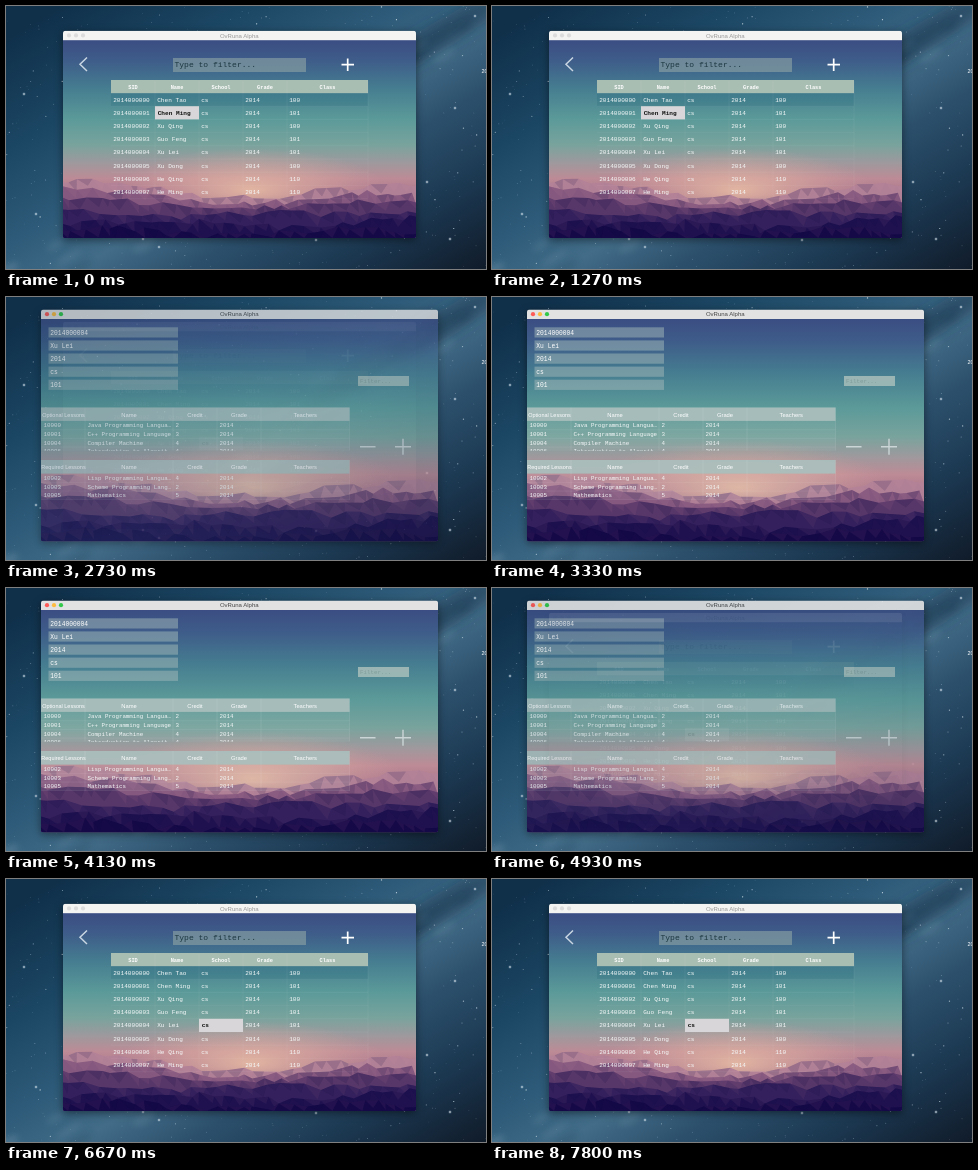
An HTML page for the animation above (7.87 s loop, 480 by 263 pixels).

```html
<!DOCTYPE html>
<html lang="en">
<head>
<meta charset="utf-8">
<title>Student records</title>
<style>
html, body { margin: 0; width: 100%; height: 100%; overflow: hidden; background: #1c3b56; }
svg { position: absolute; inset: 0; width: 100%; height: 100%; }
text { white-space: pre; }
.mono { font-family: "Liberation Mono", monospace; }
.sans { font-family: "Liberation Sans", sans-serif; }
.frame { filter: drop-shadow(0 2px 4px #0007); }
</style>
</head>
<body>
<svg id="desk" viewBox="0 0 480 263"></svg>
<svg id="list" viewBox="0 0 480 263"></svg>
<svg id="detail" viewBox="0 0 480 263"></svg>
<script>
const LOOP = 7870;
const TITLE = 'OvRuna Alpha';
const $ = id => document.getElementById(id);

function seeded(s) {
  return () => (s = (s * 16807) % 2147483647) / 2147483647;
}

const rect = (x, y, w, h, fill, extra = '') =>
  `<rect x="${x}" y="${y}" width="${w}" height="${h}" fill="${fill}" ${extra}/>`;
const dot = (x, y, r, fill, o = 1) =>
  `<circle cx="${x}" cy="${y}" r="${r}" fill="${fill}" opacity="${o}"/>`;
const line = (d, color, w) =>
  `<path d="${d}" fill="none" stroke="${color}" stroke-width="${w}"/>`;
const poly = (pts, fill) => `<polygon points="${pts.join(' ')}" fill="${fill}"/>`;
const label = (x, y, s, size, fill, cls = 'mono', extra = '') =>
  `<text x="${x}" y="${y}" font-size="${size}" fill="${fill}" class="${cls}" ${extra}>${s}</text>`;
const centered = (x, y, s, size, fill, cls, extra = '') =>
  label(x, y, s, size, fill, cls, 'text-anchor="middle" ' + extra);

function gradient(id, stops, where = 'x2="0" y2="1"', kind = 'linear') {
  return `<${kind}Gradient id="${id}" ${where}>` + stops.map(([at, c, o = 1]) =>
    `<stop offset="${at}" stop-color="${c}" stop-opacity="${o}"/>`).join('') + `</${kind}Gradient>`;
}

function desktop() {
  const rnd = seeded(77);
  const blur = (id, d) =>
    `<filter id="${id}" x="-50%" y="-150%" width="200%" height="400%"><feGaussianBlur stdDeviation="${d}"/></filter>`;
  const cloud = (x, y, rx, ry, fill, o, soft = 'soft') =>
    `<ellipse rx="${rx}" ry="${ry}" fill="${fill}" opacity="${o}" filter="url(#${soft})"
      transform="translate(${x} ${y}) rotate(-31)"/>`;
  // The galaxy band runs from the lower left to the upper right.
  let s = '<defs>' + blur('soft', 9) + blur('wisp', 3) + gradient('night',
    [[0, '#10304a'], [.2, '#1b4663'], [.38, '#2e5b79'], [.5, '#426c88'], [.62, '#2c506c'], [.78, '#1b3750'], [.95, '#101b29']],
    'gradientUnits="userSpaceOnUse" x1="90" y1="-20" x2="330" y2="380"') + '</defs>';
  s += rect(0, 0, 480, 263, 'url(#night)');
  s += cloud(400, 50, 120, 9, '#122a40', .75);
  for (let i = 0; i < 40; i++) {
    const x = 480 * rnd();
    s += cloud(x, 290 - .6 * x + 70 * (rnd() - .5), 8 + 18 * rnd(), 2 + 4 * rnd(), rnd() < .5 ? '#7396ab' : '#183750', .22, 'wisp');
  }
  for (let i = 0; i < 420; i++)
    s += dot(480 * rnd(), 263 * rnd(), .25 + .45 * rnd() ** 3, '#d8e8f2', .3 + .6 * rnd());
  for (const [x, y] of [[153, 241], [310, 234], [444, 233], [449, 102], [421, 176], [18, 88], [137, 233], [469, 10], [30, 208]])
    s += dot(x, y, 1.7, '#a8cde8', .25) + dot(x, y, .8, '#fff', .9);
  return s + label(475.5, 66.5, '20', 5.5, '#fff', 'sans');
}

// Low-poly dusk landscape, drawn in a 353 x 198 box.
function landscape(id) {
  const rnd = seeded(421);
  let s = '<defs>' + gradient(id + 'Sky', [[0, '#3b4d83'], [.1, '#3e5c89'], [.24, '#457c90'], [.4, '#5b9a99'],
    [.53, '#79a39d'], [.62, '#9e999d'], [.7, '#bd8b96'], [.78, '#a8758c'], [1, '#140848']]) +
    gradient(id + 'Glow', [[0, '#eabfa5', .85], [.5, '#e3b3a2', .45], [1, '#dca6a0', 0]], '', 'radial') + '</defs>';
  s += rect(0, 0, 353, 198, `url(#${id}Sky)`);
  s += `<ellipse cx="188" cy="150" rx="135" ry="42" fill="url(#${id}Glow)"/>`;
  const layers = [[154, '#b08096'], [160, '#85587f'], [167, '#573769'], [175, '#33205c'], [184, '#1f1150'], [192, '#150948']];
  layers.forEach(([base, color], depth) => {
    const ridge = [];
    for (let x = -12; x < 365; x += 6 + 12 * rnd()) {
      const valley = (12 - 2 * depth) * ((x - 190) / 176) ** 2;
      ridge.push([x, base - valley + 3 * Math.sin(x / 37 + base) - 7 * rnd() + 4]);
    }
    s += poly([[-12, 198], ...ridge, [365, 198]], color);
    for (let i = 1; i < ridge.length; i++) {
      const [a, b] = [ridge[i - 1], ridge[i]];
      const foot = [(a[0] + b[0]) / 2 + 6 * rnd(), Math.min(198, Math.max(a[1], b[1]) + 6 + 5 * rnd())];
      s += poly([a, b, foot], rnd() < .5 ? 'rgba(20,8,65,.14)' : 'rgba(225,150,175,.06)');
    }
  });
  return s;
}

function windowFrame(id, x, y, w, h, bar, lights, ink) {
  const k = w / 353;
  return `<clipPath id="${id}Clip">${rect(x, y, w, h, '#000', 'rx="2.5"')}</clipPath>` +
    `<g class="frame"><g clip-path="url(#${id}Clip)">` +
    `<g transform="translate(${x} ${y + h - 198 * k}) scale(${k})">${landscape(id)}</g>` +
    rect(x, y, w, 9.5, bar) + '</g></g>' +
    lights.map((c, i) => dot(x + 6 + 7 * i, y + 4.7, 2.1, c)).join('') +
    centered(233.3, y + 6.9, TITLE, 6, ink, 'sans');
}

const people = ['Chen Tao', 'Chen Ming', 'Xu Qing', 'Guo Feng', 'Xu Lei', 'Xu Dong', 'He Qing', 'He Ming'];
const classes = [100, 101, 100, 101, 101, 100, 110, 110];
const listCols = [105, 149, 193, 237, 281, 362];

function listWindow() {
  const rowY = i => 87 + 13.2 * i;
  const selected = (id, col, row, s) => `<g id="${id}">` +
    rect(listCols[col], rowY(row), 44, 13.2, '#d8d6d8') +
    label(listCols[col] + 2.7, rowY(row) + 8.6, s, 6.1, '#111', 'mono', 'font-weight="bold"') + '</g>';
  let s = windowFrame('listWin', 57, 24.7, 353, 207.3, '#f4f4f3', ['#dcdcdc', '#dcdcdc', '#dcdcdc'], '#999');
  s += line('M81 51.5 74 58.3 81 65', '#c9d6e2', 1.5);
  s += rect(167, 52, 133, 14, '#8fa5a6', 'opacity=".6"');
  s += label(168.5, 61.3, 'Type to filter...', 8, '#1c3740');
  s += line('M335.5 58.7H348M341.7 52.5V65', '#fff', 1.7);
  s += rect(105, 74, 257, 13.2, '#a9beb3');
  s += rect(105, 87.2, 257, 13, '#1d5f74', 'opacity=".2"');
  ['SID', 'Name', 'School', 'Grade', 'Class'].forEach((h, i) => {
    s += centered((listCols[i] + listCols[i + 1]) / 2, 82.5, h, 5.3, '#fff', 'mono', 'font-weight="bold"');
    s += line(`M${listCols[i + 1]} 75V192`, 'rgba(255,255,255,.1)', .6);
  });
  people.forEach((name, i) => {
    s += line(`M105 ${rowY(i + 1)}H362`, 'rgba(255,255,255,.08)', .6);
    [2014000000 + i, name, 'cs', 2014, classes[i]].forEach((v, c) =>
      s += label(listCols[c] + 2.2, rowY(i) + 8.5, v, 6.1, '#f6fafa'));
  });
  return s + selected('pickName', 1, 1, people[1]) + selected('pickSchool', 2, 4, 'cs');
}

const lessonCols = [35, 79, 167, 211, 255, 343.5];

function lessons(id, y, head, rows, height) {
  let s = `<clipPath id="${id}">${rect(35, y, 309, height, '#000')}</clipPath><g clip-path="url(#${id})">`;
  s += rect(35, y, 308.5, height, '#b5d0d0', 'opacity=".07"');
  s += rect(35, y, 308.5, 13.6, '#aabfbd', 'opacity=".93"');
  [head, 'Name', 'Credit', 'Grade', 'Teachers'].forEach((h, i) => {
    const x = (lessonCols[i] + lessonCols[i + 1]) / 2;
    s += centered(i ? x : 57.5, y + 9.2, h, i ? 5.8 : 5.5, '#fff', 'sans');
    s += line(`M${lessonCols[i + 1]} ${y}V${y + height}`, 'rgba(255,255,255,.16)', .6);
  });
  rows.forEach((row, i) => {
    const base = y + 20 + 8.7 * i;
    s += line(`M35 ${base + 2.4}H343.5`, 'rgba(255,255,255,.12)', .5);
    row.forEach((v, c) => s += label(lessonCols[c] + 2.6, base, v, 5.8, '#f4f8f8'));
  });
  return s + '</g>';
}

function detailWindow() {
  let s = windowFrame('detailWin', 35, 12.5, 397, 231.8, '#e2e2e2', ['#fc5b57', '#fdbc40', '#34c84a'], '#444');
  [2014000004, people[4], 2014, 'cs', 101].forEach((v, i) => {
    const y = 30.3 + 13.1 * i;
    s += rect(42.5, y, 129.5, 10.2, '#a4b9ba', 'opacity=".5"');
    s += label(44.3, y + 7.2, v, 6.3, '#fff');
  });
  s += rect(352, 79, 51, 10, '#a9bfba', 'opacity=".85"');
  s += label(354, 86, 'Filter...', 5.8, '#7f9c99');
  s += lessons('optional', 110.3, 'Optional Lessons', [
    [10000, 'Java Programming Langua…', 2, 2014],
    [10001, 'C++ Programming Language', 3, 2014],
    [10004, 'Compiler Machine', 4, 2014],
    [10006, 'Introduction to Algorit…', 4, 2014]], 43.5);
  s += lessons('required', 163, 'Required Lessons', [
    [10002, 'Lisp Programming Langua…', 4, 2014],
    [10003, 'Scheme Programming Lang…', 2, 2014],
    [10005, 'Mathematics', 5, 2014]], 40);
  return s + line('M354 149.7H369.5M389 149.7H405M397 141.7V157.7', '#cbd5d6', 1.4);
}

$('desk').innerHTML = desktop();
$('list').innerHTML = listWindow();
$('detail').innerHTML = detailWindow();

const ramp = (t, start, length) => Math.min(1, Math.max(0, (t - start) / length));

function draw(now) {
  const t = now % LOOP;
  const open = ramp(t, 2030, 900) - ramp(t, 4830, 1130);
  $('list').style.opacity = 1 - open;
  $('detail').style.opacity = open;
  // The window that is appearing lies on top.
  $('list').style.zIndex = t > 4000 ? 2 : 0;
  // A click selects another cell shortly before its record opens.
  $('pickName').style.display = t < 1600 ? '' : 'none';
  $('pickSchool').style.display = t < 1600 ? 'none' : '';
}

const start = performance.now();
function tick() {
  draw(performance.now() - start);
  requestAnimationFrame(tick);
}
tick();
</script>
</body>
</html>
```
